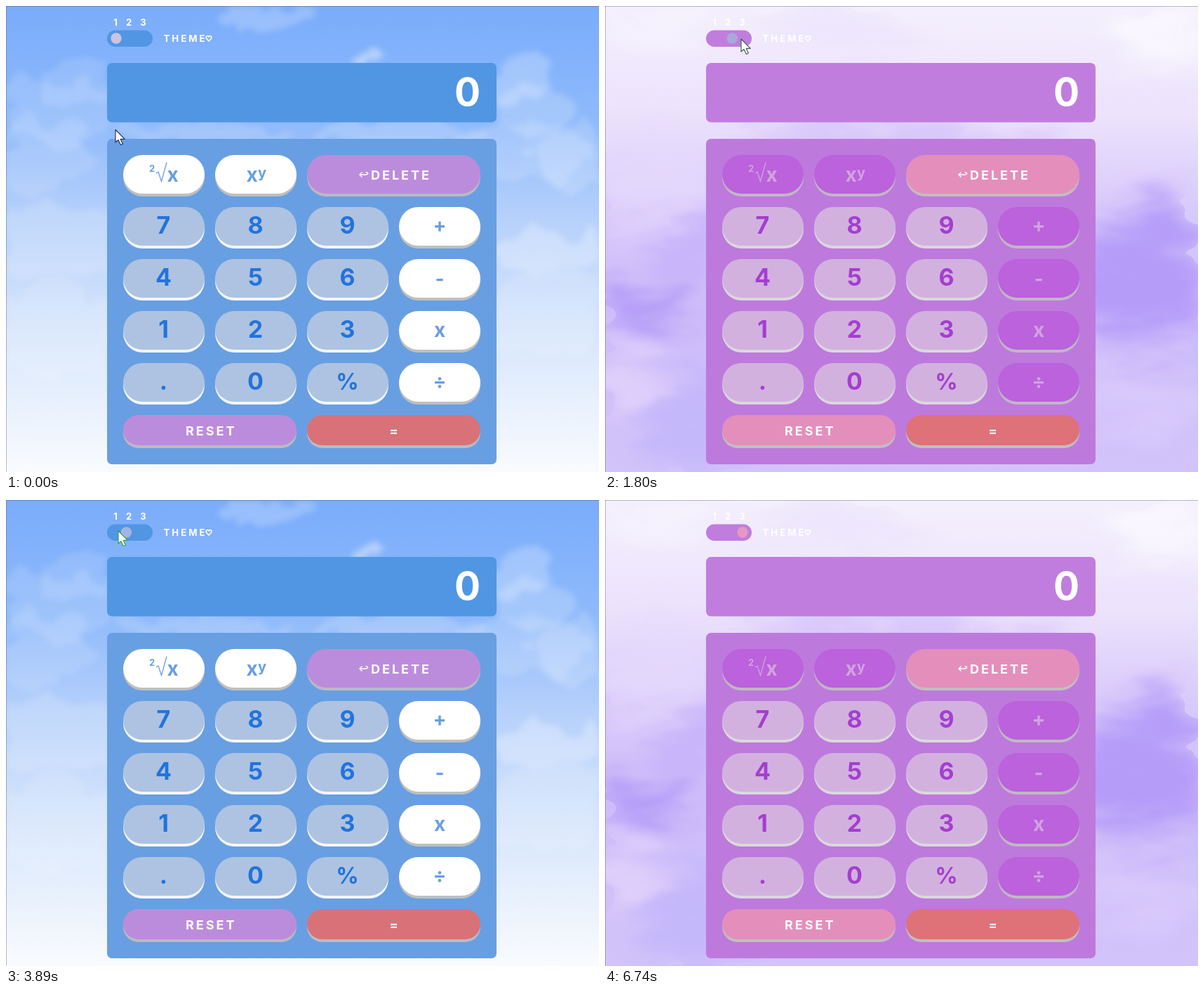
An HTML page that plays this animation: 845x663 px, repeating every 7.67 s.

```html
<!DOCTYPE html>
<html lang="en">
<head>
<meta charset="utf-8">
<title>Calculator themes</title>
<style>
  html, body { margin: 0; width: 100%; height: 100%; overflow: hidden; }
  svg { display: block; width: 845px; height: 663px; }
  text { font-family: Inter, sans-serif; font-weight: 700; }
  .sky, .blush, .lilac { display: none; }
  .theme1 .sky, .theme2 .blush, .theme3 .lilac { display: block; }
  .theme1 {
    --screen: #5196e3; --panel: #689fe2; --label: #fff; --result: #fff;
    --num: #adc3e1; --numText: #2373dc; --numEdge: #f3f6fa;
    --op: #fff; --opText: #6a9fe0; --opEdge: #bfbfbf;
    --act: #bc8cdc; --actEdge: #bdb9c3; --eq: #d87278; --pointer: #2f9e4b;
  }
  .theme2 {
    --screen: #eb87b5; --panel: #e798bf; --label: #e13c87; --result: #e7408c;
    --num: #ea80b2; --numText: #dcdadb; --numEdge: #dedadb;
    --op: #dadada; --opText: #e35a9d; --opEdge: #a0a0a0;
    --act: #90aedf; --actEdge: #bcbcc0; --eq: #e17375; --pointer: #4bab4f;
  }
  .theme3 {
    --screen: #c07dde; --panel: #be79dd; --label: #fff; --result: #fff;
    --num: #d2b1df; --numText: #a53ed0; --numEdge: #dcd8dd;
    --op: #bb62dc; --opText: #d2a3e0; --opEdge: #c0b8c4;
    --act: #e48ebc; --actEdge: #c3bdc0; --eq: #df7178; --pointer: #3a5a48;
  }
</style>
</head>
<body>
<svg id="stage" class="theme1" viewBox="0 0 845 663">
  <defs>
    <linearGradient id="skyFill" x2="0" y2="1">
      <stop offset="0" stop-color="#7aacfb"/><stop offset=".25" stop-color="#8fbafb"/>
      <stop offset=".45" stop-color="#b5d0fb"/><stop offset=".7" stop-color="#d7e6fc"/>
      <stop offset="1" stop-color="#f9fbfe"/>
    </linearGradient>
    <linearGradient id="lilacFill" x2="0" y2="1">
      <stop offset="0" stop-color="#f4f0fd"/><stop offset=".24" stop-color="#ece2fc"/>
      <stop offset=".42" stop-color="#d9cbfb"/><stop offset=".65" stop-color="#cdbcfa"/>
      <stop offset="1" stop-color="#d2c4fa"/>
    </linearGradient>
    <filter id="puff" filterUnits="userSpaceOnUse" x="0" y="0" width="845" height="663" color-interpolation-filters="sRGB">
      <feGaussianBlur stdDeviation="7"/>
      <feTurbulence type="fractalNoise" baseFrequency=".022" numOctaves="4" seed="4" result="noise"/>
      <feDisplacementMap in="SourceGraphic" in2="noise" scale="55" xChannelSelector="R" yChannelSelector="G"/>
      <feGaussianBlur stdDeviation="4"/>
    </filter>
    <filter id="wash" filterUnits="userSpaceOnUse" x="0" y="0" width="845" height="663" color-interpolation-filters="sRGB">
      <feTurbulence type="fractalNoise" baseFrequency=".02" numOctaves="4" seed="9" result="noise"/>
      <feDisplacementMap in="SourceGraphic" in2="noise" scale="75" xChannelSelector="R" yChannelSelector="G"/>
      <feGaussianBlur stdDeviation="3"/>
    </filter>
    <filter id="haze" filterUnits="userSpaceOnUse" x="0" y="0" width="845" height="663" color-interpolation-filters="sRGB">
      <feGaussianBlur stdDeviation="20" result="soft"/>
      <feTurbulence type="fractalNoise" baseFrequency=".008 .022" numOctaves="3" seed="2" result="noise"/>
      <feDisplacementMap in="soft" in2="noise" scale="90" xChannelSelector="R" yChannelSelector="G"/>
    </filter>
  </defs>
  <g class="sky"><rect width="845" height="663" fill="url(#skyFill)"/><g id="clouds" filter="url(#puff)"/></g>
  <g class="blush"><rect width="845" height="663" fill="#fff"/><g id="stains" filter="url(#wash)"/></g>
  <g class="lilac"><rect width="845" height="663" fill="url(#lilacFill)"/><g id="mist" filter="url(#haze)"/></g>
  <path d="M0 .5H845M.5 0V663" stroke="#556" stroke-opacity=".4"/>
  <g id="calculator"></g>
  <circle id="knob" cy="46" r="7.7"/>
  <circle id="press" r="14.5" fill="#ff0" fill-opacity=".4"/>
  <path id="pointer" d="M0 0V18L4 14.5L7.3 21.5L10.3 20.2L7.2 13.4H13.2Z" fill="#fff" stroke-width="1.1" stroke-linejoin="round"/>
</svg>
<script>
const byId = id => document.getElementById(id);
const stage = byId('stage'), knob = byId('knob'), press = byId('press'), pointer = byId('pointer');

function add(parent, tag, attributes, content = '') {
  const node = document.createElementNS('http://www.w3.org/2000/svg', tag);
  for (const [name, value] of Object.entries(attributes)) node.setAttribute(name, value);
  node.textContent = content;
  parent.append(node);
}

// Backgrounds: soft blobs roughened by the noise filters
function blobs(id, list) {
  for (const [cx, cy, rx, ry, fill, opacity] of list)
    add(byId(id), 'ellipse', { cx, cy, rx, ry, fill, opacity });
}
blobs('clouds', [
  [375, 8, 75, 26, '#fff', .22], [515, 80, 28, 10, '#fff', .4],
  [70, 150, 85, 50, '#fff', .14], [100, 110, 55, 35, '#fff', .13], [40, 215, 90, 55, '#fff', .13],
  [735, 105, 42, 35, '#fff', .24], [755, 145, 55, 40, '#fff', .2], [740, 205, 90, 45, '#fff', .16],
  [820, 215, 70, 40, '#fff', .17], [280, 180, 130, 14, '#fff', .15], [560, 182, 130, 20, '#fff', .18],
  [60, 340, 110, 55, '#fff', .16], [770, 350, 80, 30, '#fff', .26], [790, 440, 110, 60, '#fff', .14],
  [60, 460, 110, 60, '#fff', .14]
]);
blobs('stains', [
  [420, 60, 560, 200, '#fdecec', 1], [60, 170, 130, 125, '#fdebec', 1], [10, 345, 32, 60, '#fdf0f0', 1],
  [770, 240, 120, 115, '#fdebec', 1], [815, 310, 60, 90, '#fce2e4', 1],
  [60, 60, 90, 70, '#fce0e3', .7], [10, 110, 50, 90, '#fbdfe2', .8], [250, 140, 160, 60, '#fde2e4', .6],
  [615, 130, 110, 70, '#fbdcdf', .8], [800, 70, 65, 60, '#f9cfd4', .85], [830, 130, 65, 75, '#f9cdd2', .7],
  [740, 190, 55, 60, '#fce1e4', .8], [420, 40, 95, 30, '#fef3f2', .8], [700, 35, 60, 30, '#fdeeee', .7]
]);
blobs('mist', [
  [420, 195, 240, 22, '#c9b4fb', .7], [775, 390, 120, 85, '#ac91f8', .75], [800, 320, 90, 40, '#b49cf8', .6],
  [35, 420, 85, 32, '#aa8ef7', .7], [120, 340, 60, 50, '#c4b0fa', .7], [130, 600, 60, 90, '#c2b6fa', .8],
  [30, 540, 70, 45, '#e3d4fc', .8], [760, 560, 90, 40, '#dccdfc', .7], [60, 250, 120, 60, '#e5dafc', .7],
  [800, 40, 80, 50, '#faf8fe', .9], [60, 25, 100, 20, '#f8f4fe', .8], [330, 30, 130, 18, '#e7dffb', .7]
]);

const calculator = byId('calculator');
const paint = name => `fill:var(--${name})`;
const box = (x, y, width, height, rx, color) =>
  add(calculator, 'rect', { x, y, width, height, rx, style: paint(color) });
const label = (content, x, y, size, color, more = {}) =>
  add(calculator, 'text', { x, y, 'font-size': size, 'text-anchor': 'middle', style: paint(color), ...more }, content);
const spaced = { 'text-anchor': 'start', 'letter-spacing': 3, 'font-weight': 700 };

function button(x, y, width, height, kind, edge = kind + 'Edge') {
  box(x, y + 4, width, height, height / 2, edge);
  box(x, y, width, height, height / 2, kind);
}

// Header, screen and panel
box(144, 34.5, 65, 23.5, 11.7, 'screen');
[156, 175, 195.5].forEach((x, i) => label(i + 1, x, 27.5, 13, 'label'));
label('THEME', 224.5, 51, 13.2, 'label', spaced);
add(calculator, 'path', {
  d: 'M289 50L285.6 46.2C284 43 287.6 41.4 289 44C290.4 41.4 294 43 292.4 46.2Z',
  style: 'fill:none;stroke:var(--label);stroke-width:1.5'
});
box(144, 81, 555, 84.5, 7, 'screen');
label('0', 657.5, 141.5, 55, 'result');
box(144, 189, 555, 463, 7, 'panel');

// Keys
const columns = [167, 298, 429, 560], rows = [286, 360, 434, 508];
button(columns[0], 212, 116, 55, 'op');
label('2', 208, 235.5, 13, 'opText');
add(calculator, 'path', {
  d: 'M214 238L217 236L221.5 249.5L229 222.5', style: 'fill:none;stroke:var(--opText);stroke-width:1.3'
});
label('x', 237.5, 249.5, 28, 'opText', { 'font-weight': 800 });
button(columns[1], 212, 116, 55, 'op');
label('x', 350.5, 249.5, 28, 'opText', { 'font-weight': 800 });
label('y', 365, 243.5, 20, 'opText');
button(columns[2], 212, 247, 55, 'act');
add(calculator, 'path', {
  d: 'M507.5 236.5L504 240L507.5 243.5M504 240H513C516.5 239.5 516.5 236.5 512.5 236.8',
  fill: 'none', stroke: '#fff', 'stroke-width': 1.4
});
add(calculator, 'text', { x: 520, y: 246.5, 'font-size': 18, fill: '#fff', ...spaced }, 'DELETE');

['789', '456', '123', '.0%'].forEach((keys, row) => [...keys].forEach((key, column) => {
  button(columns[column], rows[row], 116, 55, 'num');
  const style = key === '%' ? { 'font-weight': 500 } : {};
  label(key, columns[column] + 57.5, rows[row] + 38.3, key === '%' ? 32 : 34, 'numText', style);
}));
[['+', 322], ['-', 397.5], ['x', 471], ['÷', 544]].forEach(([sign, baseline], row) => {
  button(columns[3], rows[row], 116, 55, 'op');
  label(sign, 618, baseline, 28, 'opText', { 'font-weight': 800 });
});
button(columns[0], 582, 247, 43, 'act');
add(calculator, 'text', { x: 256, y: 610.5, 'font-size': 18, fill: '#fff', ...spaced }, 'RESET');
button(columns[2], 582, 247, 43, 'eq', 'actEdge');
add(calculator, 'text', { x: 552.5, y: 610.5, 'font-size': 18, fill: '#fff', 'text-anchor': 'middle' }, '=');

// Motion
const LOOP = 7670, POINTER_GONE = 6740;
const switches = [[0, 1], [780, 2], [1800, 3], [3040, 2], [3890, 1], [4880, 2], [6050, 3]];
const presses = [[1740, 1800], [2890, 3040], [3810, 3890], [5890, 6050]];
const pointerPath = [
  [0, 156, 176], [80, 157, 170], [400, 167, 95], [700, 173, 43], [1180, 173, 43], [1570, 194, 47],
  [2420, 194, 47], [2720, 178, 48], [3270, 178, 48], [3660, 160, 44], [4160, 160, 44],
  [4400, 149, 40], [4740, 173, 43], [5200, 173, 43], [5580, 190, 47], [5800, 194, 47],
  [6440, 194, 47], [6670, 201, 19], [LOOP, 201, 19]
];
const knobs = [null, [157, 208, 194, 222], [176.3, 148, 175, 226], [196, 228, 152, 194]];
const mix = (a, b, p) => a.map((v, i) => v + (b[i] - v) * p);

function pointerAt(t) {
  const i = pointerPath.findIndex(point => point[0] > t);
  const a = pointerPath[i - 1], b = pointerPath[i];
  return mix(a, b, (t - a[0]) / (b[0] - a[0])).slice(1);
}

function draw(t) {
  const index = switches.findLastIndex(([start]) => start <= t);
  const [start, theme] = switches[index];
  const previous = index ? switches[index - 1][1] : theme;
  const progress = 1 - (1 - Math.min(1, (t - start + 30) / 250)) ** 2.2;
  const [x, ...color] = mix(knobs[previous], knobs[theme], progress);
  stage.setAttribute('class', 'theme' + theme);
  knob.setAttribute('cx', x);
  knob.setAttribute('fill', `rgb(${color.map(Math.round)})`);

  const place = `translate(${pointerAt(t).map(v => Math.round(v))})`;
  pointer.setAttribute('transform', place);
  pointer.style.stroke = t < 700 ? '#1d2d5c' : 'var(--pointer)';
  pointer.style.display = t < POINTER_GONE ? '' : 'none';
  press.setAttribute('transform', place);
  press.style.display = presses.some(([from, to]) => t >= from && t < to) ? '' : 'none';
}

const began = performance.now();
function tick() {
  draw((performance.now() - began) % LOOP);
  requestAnimationFrame(tick);
}
tick();
</script>
</body>
</html>
```
